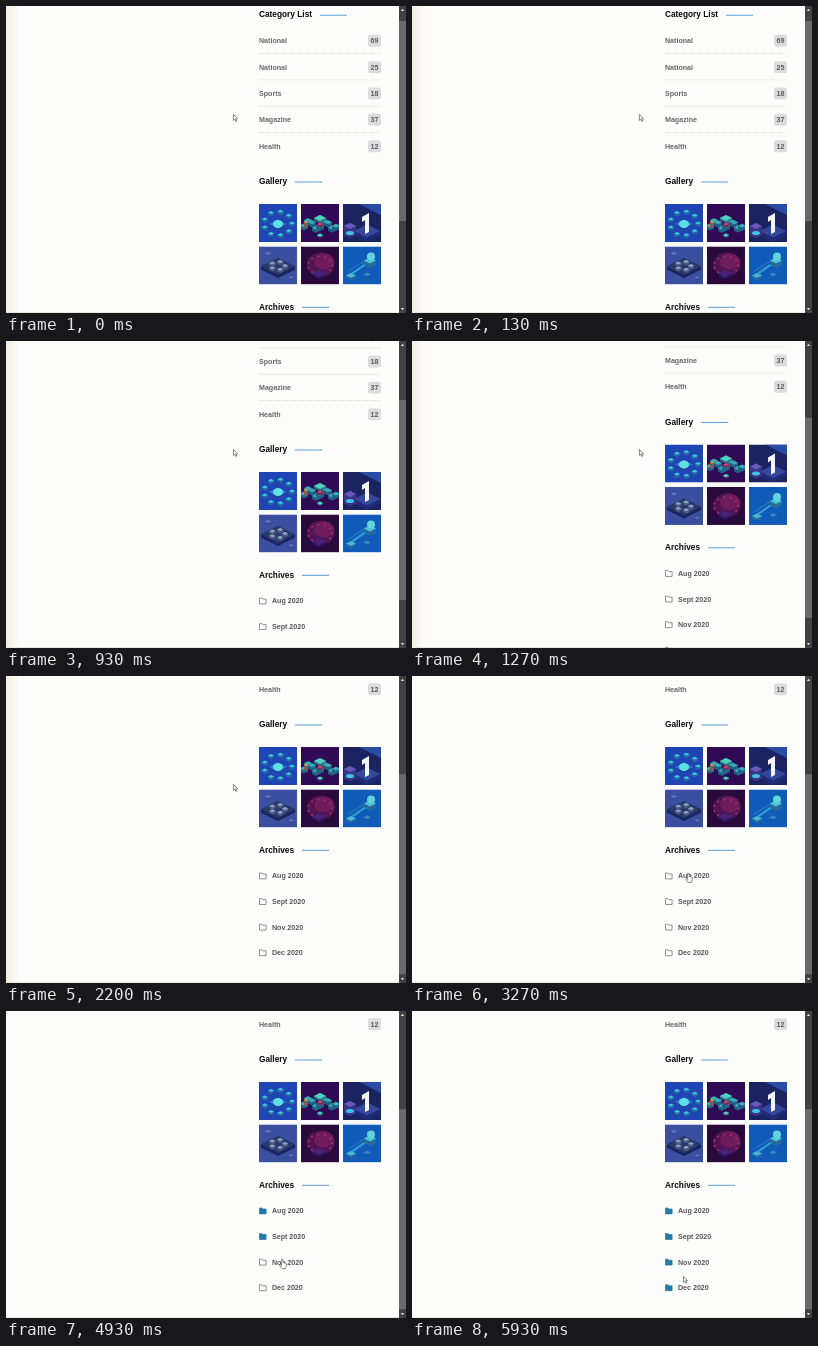
An HTML page with a canvas for the animation above (6000 ms loop, 400 by 307 pixels).

```html
<!DOCTYPE html>
<html lang="en">
<head>
<meta charset="utf-8">
<title>Sidebar scroll</title>
<style>
html, body { margin: 0; width: 100%; height: 100%; overflow: hidden; background: #fdfdfb; }
canvas { display: block; }
</style>
</head>
<body>
<canvas id="stage" width="400" height="307"></canvas>
<script>
const c = document.getElementById('stage').getContext('2d');
const LOOP = 6000, LEFT = 253, RIGHT = 375, PAPER = '#fdfdfb';
const categories = { first: 34.8, step: 26.35 }, archives = { first: 327, step: 25.6 };
const counts = [['National', 69], ['National', 25], ['Sports', 18], ['Magazine', 37], ['Health', 12]];
const months = ['Aug 2020', 'Sept 2020', 'Nov 2020', 'Dec 2020'];

const rowY = (list, i) => list.first + list.step * i;
const clickTime = i => 3420 + 770 * i;

// Smooth 0 to 1 between two times
function ease(t, from, to) {
  const p = Math.min(1, Math.max(0, (t - from) / (to - from)));
  return p * p * (3 - 2 * p);
}

const scrollAt = t => 67 * ease(t, 170, 424) + 60 * ease(t, 1120, 1440);

// The pointer reaches each archive row, waits, clicks and moves on
function pointerAt(t) {
  const arrive = ease(t, 2250, 3090), leave = ease(t, 5760, 5910);
  let y = 108 + 89 * arrive - 9 * leave;
  for (let i = 1; i < months.length; i++)
    y += archives.step * ease(t, clickTime(i - 1) + 80, clickTime(i) - 330);
  return [227 + 49 * arrive - 5 * leave, y];
}

function rect(x, y, w, h, color) {
  c.fillStyle = color;
  c.fillRect(x, y, w, h);
}

function shape(path, x, y, fill, stroke) {
  const p = new Path2D(path);
  c.save();
  c.translate(x, y);
  c.lineWidth = 0.7;
  if (fill) { c.fillStyle = fill; c.fill(p); }
  if (stroke) { c.strokeStyle = stroke; c.stroke(p); }
  c.restore();
}

function line(x1, y1, x2, y2, color, width = 1, dash = []) {
  c.setLineDash(dash);
  c.strokeStyle = color;
  c.lineWidth = width;
  c.beginPath();
  c.moveTo(x1, y1);
  c.lineTo(x2, y2);
  c.stroke();
  c.setLineDash([]);
}

function blob(x, y, rx, ry, color) {
  c.fillStyle = color;
  c.beginPath();
  c.ellipse(x, y, rx, ry, 0, 0, 7);
  c.fill();
}

function text(s, x, y, size, color, align = 'left') {
  c.font = `bold ${size}px "Liberation Sans", Arial, sans-serif`;
  c.textAlign = align;
  c.fillStyle = color;
  c.fillText(s, x, y + size * 0.35);
}

function heading(s, y) {
  text(s, LEFT, y, 8.3, '#0a0a0e');
  const x = LEFT + c.measureText(s).width + 8;
  line(x, y + 0.7, x + 27, y + 0.7, '#5c9ddc');
}

// Isometric block with a shaded body, top face centred on x, y
function block(x, y, r, h, color) {
  const k = r / 2;
  const body = `M${-r} 0L0 ${-k}L${r} 0v${h}L0 ${k + h}L${-r} ${h}z`;
  shape(body, x, y, color);
  shape(body, x, y, 'rgba(10,15,90,.5)');
  shape(`M${-r} 0L0 ${-k}L${r} 0L0 ${k}z`, x, y, color);
}

// Calls draw with n points spread around an ellipse
function ring(n, rx, ry, draw) {
  for (let i = 0; i < n; i++) {
    const a = i / n * 2 * Math.PI;
    draw(19 + rx * Math.cos(a), 19 + ry * Math.sin(a));
  }
}

const CYAN = '#3ec3e0', MINT = '#4fd0bd';
const pictures = [
  ['#1f45b4', () => {
    ring(9, 14, 12, (x, y) => block(x, y, 3, 2, CYAN));
    block(19, 20, 9, 2, '#2f78d8');
    blob(19, 20, 5, 4, '#5fe0e6');
  }],
  ['#2f0a55', () => {
    for (let x = 3; x < 38; x += 4) block(x, 20 + 4 * Math.cos(x * 0.39), 4, 3, '#38aeb4');
    block(19, 14, 6, 2, MINT);
    block(19, 20, 3, 2, '#c2495c');
    block(19, 31, 3, 1, MINT);
    block(5, 18, 2, 5, '#f0a848');
  }],
  ['#1b2360', () => {
    shape('M0 0h38v11L16 0z', 0, 0, '#2a4ca6');
    block(24, 27, 13, 4, '#34479a');
    shape('M0 4l7-4v19l-4 2v-14l-3 2z', 19, 9, '#f4f6f6');
    block(7, 22, 6, 9, '#6a58bc');
    blob(7, 29, 4, 2, CYAN);
  }],
  ['#3b4fa0', () => {
    block(19, 20, 17, 3, '#2a3a68');
    ring(5, 7, 4, (x, y) => block(x, y, 3, 2, '#8ea4be'));
    block(9, 7, 4, 1, '#5570bd');
    block(32, 31, 3, 1, '#5570bd');
  }],
  ['#280a3c', () => {
    blob(20, 18, 14, 12, '#521452');
    blob(23, 15, 10, 8, '#701b5c');
    ring(11, 12, 9, (x, y) => blob(x, y, 1, 1, '#a8346c'));
    block(18, 27, 7, 2, '#4a2176');
  }],
  ['#115bb8', () => {
    line(5, 30, 28, 14, '#2f9fd2', 2);
    line(5, 25, 22, 14, '#2a7fc8');
    block(27, 14, 6, 4, '#48c6d8');
    blob(28, 10, 4, 4, '#62d4dc');
    block(8, 29, 5, 2, '#45b8d4');
    block(24, 28, 4, 1, '#2e88d0');
  }]
];

function picture([color, draw], i) {
  c.save();
  c.translate(LEFT + i % 3 * 42, 198 + Math.floor(i / 3) * 42.4);
  c.beginPath();
  c.rect(0, 0, 38, 38);
  c.clip();
  rect(0, 0, 38, 38, color);
  draw();
  c.restore();
}

function page(t) {
  heading('Category List', 8.5);
  counts.forEach(([name, count], i) => {
    const y = rowY(categories, i);
    text(name, LEFT, y, 7.1, '#66666c');
    c.fillStyle = '#dcdcde';
    c.beginPath();
    c.roundRect(362, y - 6, 13, 12, 2.5);
    c.fill();
    text(count, 368.5, y, 7.1, '#5c5c62', 'center');
    if (i < 4) line(LEFT, y + 12.7, RIGHT, y + 12.7, '#d4d4d8', 0.8, [1, 1]);
  });
  heading('Gallery', 175.3);
  pictures.forEach(picture);
  heading('Archives', 300.6);
  months.forEach((name, i) => {
    const y = rowY(archives, i), filled = t >= clickTime(i);
    const color = filled ? '#217ba6' : '#66666c';
    shape('M0-3h2.4l.9 1h3.3v4.9H0z', LEFT + 0.5, y, filled && color, color);
    text(name, 266, y, 7.1, '#56565c');
  });
}

function scrollbar(scroll) {
  rect(393, 0, 7, 307, '#424244');
  rect(393, 15 + scroll * 0.655, 7, 200, '#6a6a6c');
  shape('M-1.7 1.1L0-1.1L1.7 1.1z', 396.5, 3.9, '#d8d8dc');
  shape('M-1.7-1.1L0 1.1L1.7-1.1z', 396.5, 303.1, '#d8d8dc');
}

function edges(t) {
  if (t < 2800) {
    const shade = c.createLinearGradient(0, 0, 14, 0);
    shade.addColorStop(0, '#efeede');
    shade.addColorStop(1, PAPER);
    rect(0, 0, 14, 307, shade);
  }
  rect(0, 306, 393, 1, '#e8e8dc');
}

function pointer(x, y, scroll) {
  const onLink = x > LEFT && months.some((_, i) => Math.abs(y + 1 - rowY(archives, i) + scroll) < 6);
  const hand = 'M-.8 0L.6 0L.8 3L3.8 3.8L4 6.5L3 9H-.5L-2.7 5.8L-2 5L-.8 6z';
  const arrow = 'M0 0V6L1.4 4.9L2.3 7L3.3 6.6L2.4 4.5H4.2z';
  shape(onLink ? hand : arrow, x + 0.4, y + 0.4, '#fff', '#55555a');
}

function frame(now) {
  const t = now % LOOP, scroll = scrollAt(t);
  rect(0, 0, 400, 307, PAPER);
  edges(t);
  c.save();
  c.translate(0, -scroll);
  page(t);
  c.restore();
  scrollbar(scroll);
  pointer(...pointerAt(t), scroll);
  requestAnimationFrame(() => frame(performance.now() - start));
}

const start = performance.now();
frame(0);
</script>
</body>
</html>
```
